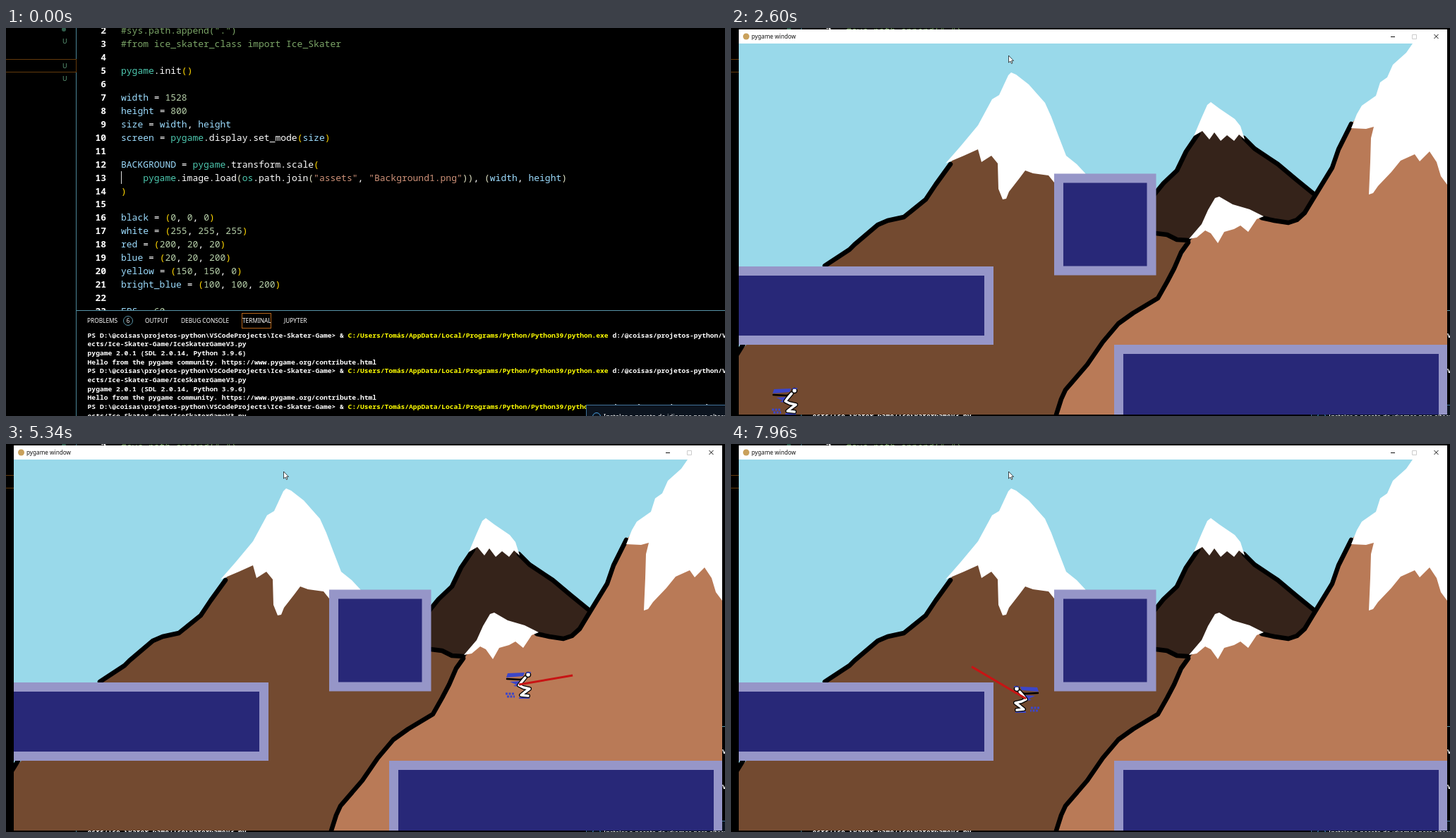
Recreate the animation shown at these times as an HTML page. Size 1019 by 550 pixels, loop 8 s.

```html
<!DOCTYPE html>
<html lang="pt">
<head>
<meta charset="utf-8">
<title>pygame window</title>
<style>
html, body { margin: 0; width: 100%; height: 100%; overflow: hidden; background: #000; }
#stage { position: absolute; left: 0; top: 0; width: 1019px; height: 550px; overflow: hidden; background: #000; color: #fff; }
#stage div { position: absolute; white-space: pre; }
svg { position: absolute; left: 0; top: 0; }
#code { left: 100px; top: 0; width: 919px; height: 400px; overflow: hidden; }
#code div { font: 500 13px/18.94px "Noto Sans Mono", "DejaVu Sans Mono", monospace; }
#code .num { left: 0; width: 42px; text-align: right; font-weight: 600; }
#code .src { left: 63px; }
#caret { left: 163px; top: 203px; width: 1px; height: 18px; background: #ddd; }
#side { left: 0; top: 0; width: 99px; height: 550px; border-right: 1px solid #4b8496; }
#side div { left: 80px; font: 9px/12px "Noto Sans", sans-serif; color: #5f9f7c; }
#side .row { left: -2px; top: 44px; width: 100px; height: 17px; border: 1px solid #643a0c; }
#side .dot { left: 79px; top: -1px; width: 6px; height: 6px; border-radius: 50%; background: #2f5c4b; }
#panel { left: 100px; top: 400px; width: 919px; height: 150px; border-top: 1px solid #5795a9; background: #000; }
.tab { top: 8px; font: 500 8.3px/12px "Noto Sans", "Open Sans", sans-serif; }
#badge { left: 66px; top: 7px; width: 12px; height: 12px; border: 1px solid #5795a9; border-radius: 50%; text-align: center; font: 8px/12px "Noto Sans", sans-serif; }
#active { left: 234px; top: 3px; width: 40px; height: 20px; border: 1px solid #b5651a; }
#term { left: 15.6px; top: 28.7px; font: 600 9.62px/12.65px "Noto Sans Mono", "DejaVu Sans Mono", monospace; }
#term i { font-style: normal; color: #ff0; }
#note { left: 822px; top: 534px; width: 220px; height: 40px; border: 1px solid #41739a; background: #0c141f; }
#note div { left: 24px; top: 9px; font: 9.4px/14px "Noto Sans", sans-serif; }
#note .info { left: 8px; top: 10px; width: 10px; height: 10px; border: 1px solid #4aa0e0; border-radius: 50%; }
#win { transform-origin: 513px 275px; }
#win text { font: 8.2px "Noto Sans", "Open Sans", sans-serif; }
.ridge { fill: none; stroke: #000; stroke-width: 6.5; stroke-linejoin: round; stroke-linecap: round; }
.snow { fill: #fff; }
.limb { fill: none; stroke-linejoin: round; stroke-linecap: round; }
</style>
</head>
<body>
<div id="stage">
  <div id="side"></div>
  <div id="code"></div>
  <div id="caret"></div>
  <div id="panel">
    <div id="active"></div>
    <div id="badge">6</div>
    <div id="term"></div>
  </div>
  <div id="note"><div class="info"></div><div>Instalar o pacote de idiomas para alterar</div></div>

  <svg id="win" width="1019" height="550" viewBox="0 0 1019 550">
    <defs>
      <clipPath id="client"><rect x="11" y="22" width="1004" height="526"/></clipPath>
    </defs>
    <rect x="11" y="2" width="1004" height="546" fill="#000"/>
    <rect x="11" y="2" width="1004" height="20" fill="#fff"/>
    <rect id="iconA" x="18" y="8" width="9" height="8" fill="#2c4a68"/>
    <circle id="iconB" cx="21.5" cy="12" r="4.5" fill="#c9a15c"/>
    <text x="29" y="15" fill="#111">pygame window</text>
    <path d="M935 12.5h6" stroke="#111" fill="none"/>
    <path d="M965.500 9.500h6v6h-6z" stroke="#ccc" fill="none"/>
    <path d="M996.500 9l6 6m0-6l-6 6" stroke="#111" fill="none"/>

    <g id="game" clip-path="url(#client)">
      <rect x="11" y="22" width="1004" height="526" fill="#99d9ea"/>
      <path fill="#35231a" d="M590 245L602 235 628 205 642 180 662 148 680 120 727 155 775 195 828 236 805 275 755 272 650 304 590 295z"/>
      <path class="ridge" d="M600 236L613 220 632 202 645 175 662 150"/>
      <path class="ridge" d="M727 156L742 171 775 193 800 214 827 236"/>
      <path class="snow" d="M656 153L667 127 675 109 680 105 692 114 714 129 722 139 728 158 720 151 713 160 703 152 694 160 685 148 678 158 668 146z"/>

      <path fill="#734a30" d="M11 460L130 338 170 311 208 279 245 268 280 237 310 192 350 140 397 80 470 190 503 207 602 291 648 303 605 383 460 548 11 548z"/>
      <path class="ridge" d="M9 462L17 449M133 337L168 314 175 307 208 279 222 273 245 268 276 243 290 222 311 193"/>
      <path class="snow" d="M304 192L325 168 350 138 370 101 380 95 393 67 397 63 404 66 422 80 445 106 454 126 463 150 475 181 490 193 503 207 470 208 458 219 450 209 428 206 417 202 408 214 394 232 390 242 385 243 379 228 378 192 369 181 355 190 350 172 330 181z"/>

      <path fill="#b97a57" d="M460 548L472 515 505 477 527 445 550 418 605 383 625 350 650 302 692 260 752 270 790 277 812 262 830 232 853 195 862 170 880 134 965 60 1015 60 1015 548z"/>
      <path class="ridge" d="M602 291L618 293 632 300 648 301M461 548L468 526 474 513 505 477 527 445 549 419 570 404 605 383 618 360 628 341 638 318 648 304"/>
      <path class="ridge" d="M752 269L770 273 790 276 802 272 813 262 830 234 852 198 861 172 870 154 879 136"/>
      <path class="snow" d="M649 299L667 278 676 258 686 241 692 239 711 250 735 257 755 267 745 271 733 289 722 280 713 285 699 289 690 305 680 291 672 287 660 297z"/>
      <path class="snow" d="M879 142L887 122 894 110 914 96 920 77 930 70 938 52 957 35 966 22 1015 22 1015 222 1006 210 1000 190 990 175 976 189 969 179 949 188 936 204 917 224 910 234 904 236 906 190 907 156 911 140 900 143z"/>

      <g fill="#282878" stroke="#9696c8" stroke-width="13">
        <path d="M0 344.500H365.500V442.500H0z"/>
        <path d="M464.500 213H596V344H464.500z"/>
        <path d="M549.500 455.500H1009.500V560H549.500z"/>
      </g>

      <g id="skater">
        <g id="body">
          <path fill="#3c46c8" d="M-16 -16L8 -17 6 -12 -18 -10zM-13 -4L2 -5 1 3 -8 2 -4 0z"/>
          <path stroke="#3c46c8" stroke-width="3" stroke-dasharray="3 1.500" fill="none" d="M-19 13H-6M-17 17H-6"/>
          <path stroke="#3c46c8" stroke-width="2" d="M0 19H15"/>
          <path class="limb" stroke="#000" stroke-width="2.500" d="M-17 -8L2 -7 10 -10"/>
          <g id="limbs">
            <path class="limb" d="M9 -10L3 -3 0 1 6 4 15 6 8 11 3 15 13 16"/>
          </g>
          <circle cx="13" cy="-14" r="3.500" fill="#fff" stroke="#000" stroke-width="1.500"/>
          <path d="M10 -17H17" stroke="#3c46c8" stroke-width="1.500"/>
        </g>
        <line id="speed" stroke="#c81414" stroke-width="3"/>
      </g>
    </g>
  </svg>

  <svg width="1019" height="550">
    <path id="cursor" d="M0 0V10L2.400 8 4 11.400 5.500 10.700 4 7.400H7z" fill="#fff" stroke="#000" stroke-width=".7"/>
  </svg>
</div>

<script>
const $ = id => document.getElementById(id);

function add(parent, text, cls, style) {
  const el = document.createElement('div');
  el.textContent = text;
  if (cls) el.className = cls;
  Object.assign(el.style, style);
  parent.append(el);
  return el;
}

// Editor text
const source = `#sys.path.append(".")
#from ice_skater_class import Ice_Skater

pygame.init()

width = 1528
height = 800
size = width, height
screen = pygame.display.set_mode(size)

BACKGROUND = pygame.transform.scale(
    pygame.image.load(os.path.join("assets", "Background1.png")), (width, height)
)

black = (0, 0, 0)
white = (255, 255, 255)
red = (200, 20, 20)
blue = (20, 20, 200)
yellow = (150, 150, 0)
bright_blue = (100, 100, 200)

FPS = 60`.split('\n');

const brackets = ['#ffd700', '#e0e2c4', '#e0e2c4'];
let depth = 0;

function colorOf(token) {
  if (token[0] === '#') return '#7ca668';
  if (token[0] === '"') return '#ce9178';
  if (token === '(') return brackets[depth++];
  if (token === ')') return brackets[--depth];
  if (/^\d/.test(token)) return '#b5cea8';
  if (/^(pygame|os)$/.test(token)) return '#4ec9b0';
  if (/^\.\w/.test(token)) return '#fff';
  return /^\w/.test(token) ? '#9cdcfe' : '#fff';
}

source.forEach((line, i) => {
  const top = 41.6 + (i - 2) * 18.94 - 9.47 + 'px';
  add($('code'), i + 2, 'num', { top });
  const row = add($('code'), '', 'src', { top });
  for (const token of line.match(/#.*|"[^"]*"|\.?\w+|\s+|./g) || []) {
    const span = document.createElement('span');
    span.textContent = token;
    span.style.color = colorOf(token);
    row.append(span);
  }
});

add($('side'), '', 'row');
add($('side'), '', 'dot');
for (const y of [19, 54, 72]) add($('side'), 'U', '', { top: y - 6 + 'px' });

for (const [x, name] of [[15, 'PROBLEMS'], [97, 'OUTPUT'], [148, 'DEBUG CONSOLE'], [235, 'TERMINAL'], [294, 'JUPYTER']])
  add($('panel'), name, 'tab', { left: x + 'px' });

const log = [
  'PS D:\\@coisas\\projetos-python\\VSCodeProjects\\Ice-Skater-Game&gt; &amp; <i>C:/Users/Tomás/AppData/Local/Programs/Python/Python39/python.exe</i> d:/@coisas/projetos-python/VSCodeProj',
  'ects/Ice-Skater-Game/IceSkaterGameV3.py',
  'pygame 2.0.1 (SDL 2.0.14, Python 3.9.6)',
  'Hello from the pygame community. https://www.pygame.org/contribute.html'
];
let shownFrom = -1;

function scrollTerminal(from) {
  if (from === shownFrom) return;
  shownFrom = from;
  $('term').innerHTML = Array.from({ length: 10 }, (_, i) => log[(i + from) % 4]).join('\n');
}

// White limbs over a black outline
const limb = $('limbs').firstElementChild;
const inner = limb.cloneNode();
limb.setAttribute('stroke', '#000');
limb.setAttribute('stroke-width', 6);
inner.setAttribute('stroke', '#fff');
inner.setAttribute('stroke-width', 3.5);
$('limbs').append(inner);

// Motion keys: time, position, velocity
const LOOP = 8000, WALL_HIT = 5925, LINE_SCALE = 162;
const pathX = [
  [2928, 77, 0], [3440, 108, .123], [3650, 137, .17], [4520, 371, .38], [4650, 422, .42],
  [5340, 727, .47], [WALL_HIT, 996, .48], [WALL_HIT + 1, 996, -.2], [6040, 973, -.228],
  [6170, 945, -.24], [7000, 759, -.265], [7820, 479, -.457], [7960, 418, -.475], [8000, 399, -.48]
];
const pathY = [
  [4500, 528, 0], [4501, 528, -.335], [4650, 487, -.327], [5340, 341, -.08], [5590, 331, 0],
  [6040, 361, .142], [6170, 384, .19], [6370, 429, .28], [6371, 429, -.125], [6770, 404, 0],
  [7170, 429, .125], [7171, 429, -.05], [7330, 425, 0], [7490, 429, .05], [7491, 429, 0],
  [7735, 429, 0], [7736, 429, -.35], [7820, 400, -.335], [7960, 361, -.28], [8000, 350, -.27]
];

// Cubic Hermite position and velocity at time t
function motion(keys, t) {
  if (t <= keys[0][0]) return [keys[0][1], 0];
  let i = 1;
  while (i < keys.length - 1 && t > keys[i][0]) i++;
  const [t0, p0, v0] = keys[i - 1], [t1, p1, v1] = keys[i];
  const d = t1 - t0, u = Math.min(1, (t - t0) / d);
  const a = 2 * (p0 - p1) + d * (v0 + v1);
  const b = 3 * (p1 - p0) - d * (2 * v0 + v1);
  return [((a * u + b) * u + d * v0) * u + p0, v0 + (v1 - v0) * u];
}

const beats = [
  [190, 600, 7], [2070, 2810, 12], [2880, 3650, 12], [3720, 4520, 13], [4580, 5340, 12],
  [5410, 6170, 12], [6240, 7000, 12], [7050, 7820, 12], [7900, 7960, 2]
];

function snap(t) {
  const beat = beats.filter(b => b[0] <= t).pop();
  if (!beat) return 0;
  const [start, end, count] = beat;
  const step = (end - start) / (count - 1);
  return start + Math.min(count - 1, Math.floor((t - start + 10) / step)) * step;
}

const mix = (a, b, u) => a + (b - a) * Math.max(0, Math.min(1, u));
const show = (id, on) => { $(id).style.visibility = on ? 'visible' : 'hidden'; };

function drawCursor(t) {
  let x, y;
  if (t >= 190 && t < 599) {
    const u = (t - 190) / 342;
    x = mix(822, 1008, u);
    y = mix(538, 122, u);
  } else if (t >= 2200) {
    const u = (t - 2204) / 135, v = (t - 2339) / 260;
    x = u < 1 ? mix(580, 445, u) : mix(445, 393.5, v);
    y = u < 1 ? mix(74, 48, u) : mix(48, 39, v);
  }
  show('cursor', x !== undefined);
  if (x !== undefined) $('cursor').setAttribute('transform', `translate(${x} ${y})`);
}

function drawSkater(t) {
  const [x, vx] = motion(pathX, t), [y, vy] = motion(pathY, t);
  $('skater').setAttribute('transform', `translate(${x} ${y})`);
  $('body').setAttribute('transform', `scale(${t > WALL_HIT ? -1 : 1} 1)`);
  $('speed').setAttribute('x2', vx * LINE_SCALE);
  $('speed').setAttribute('y2', vy * LINE_SCALE);
}

function draw(now) {
  const time = now % LOOP, t = snap(time);
  scrollTerminal(time >= 1930 && time < 2070 ? 2 : 0);
  const open = mix(0, 1, (t - 2136) / 220);
  $('win').style.opacity = open;
  $('win').style.transform = `scale(${1 - .1 * Math.pow(1 - open, 1.4)})`;
  const playing = t >= 2530;
  $('game').style.display = playing ? '' : 'none';
  $('iconA').style.display = playing ? 'none' : '';
  $('iconB').style.display = playing ? '' : 'none';
  drawCursor(t);
  drawSkater(t);
}

const begin = performance.now();
function tick() {
  draw(performance.now() - begin);
  requestAnimationFrame(tick);
}
tick();
</script>
</body>
</html>
```
